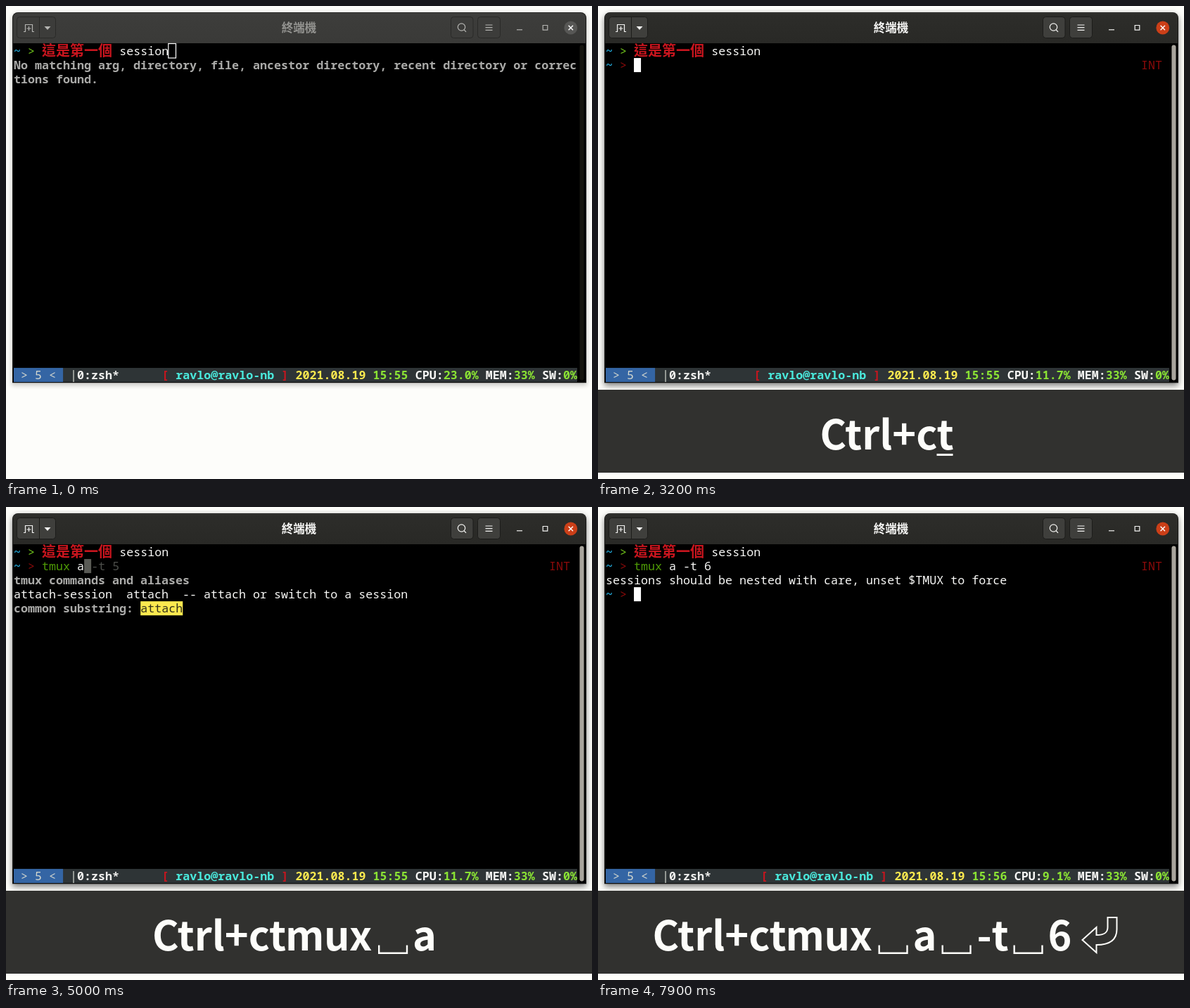
An HTML page that plays this animation: 833 px wide and 673 px high, repeating every 8000 ms.

```html
<!DOCTYPE html>
<html lang="zh-Hant">
<head>
<meta charset="utf-8">
<title>Terminal demo</title>
<style>
  html, body { margin: 0; width: 100%; height: 100%; overflow: hidden; background: #fdfdfa; }
  .shade { position: absolute; left: 10px; top: 10px; width: 814px; height: 526px; border-radius: 8px 8px 0 0; }
  #idle { box-shadow: 0 2px 6px 2px rgba(0,0,0,.2), 0 0 0 1px rgba(0,0,0,.18); }
  #live { box-shadow: 0 3px 9px 1px rgba(0,0,0,.5), 0 0 0 1px rgba(0,0,0,.23); }
  svg { position: absolute; left: 0; top: 0; display: block; }
  text { white-space: pre; }
  .term { font: 16.68px "Noto Sans Mono", "DejaVu Sans Mono", monospace; }
  .cjk { font-family: "Noto Sans CJK TC", "Noto Sans CJK JP", "Noto Sans CJK", sans-serif; font-weight: 700; }
  .b { font-weight: 700; }
  .u { text-decoration: underline; }
</style>
</head>
<body>
<div class="shade" id="idle"></div>
<div class="shade" id="live"></div>
<svg width="833" height="673" viewBox="0 0 833 673">
  <defs>
    <linearGradient id="barIdle" x2="0" y2="1"><stop stop-color="#3d3d3b"/><stop offset="1" stop-color="#3a3a38"/></linearGradient>
    <linearGradient id="barLive" x2="0" y2="1"><stop stop-color="#2d2d2a"/><stop offset="1" stop-color="#292926"/></linearGradient>
  </defs>
  <path d="M9 536V17a8 8 0 0 1 8-8H817a8 8 0 0 1 8 8V536Z" fill="#1b1b19"/>
  <rect x="10" y="53" width="814" height="482.5"/>
  <g id="headIdle"></g>
  <g id="headLive"></g>
  <g id="screen" class="term"></g>
  <g id="band"></g>
</svg>
<script>
const $ = id => document.getElementById(id);
const LOOP = 8000, CW = 10.012, RH = 20.04, X0 = 11, Y0 = 54;
const WHITE = '#f8f8f6', GREY = '#aaaaa8', DIM = '#4c4e4a', RED = '#c9151e', DARK_RED = '#8c0a0a';
const GREEN = '#8ae234', YELLOW = '#fce94f', CYAN = '#4ae9dc';
const USER = 'ravlo', HOST = 'ravlo-nb';

const esc = s => s.replace(/&/g, '&amp;').replace(/</g, '&lt;').replace(/>/g, '&gt;');
const rect = (x, y, w, h, fill, more = '') =>
  `<rect x="${x}" y="${y}" width="${w}" height="${h}" fill="${fill}" ${more}/>`;
const put = (row, col, s, fill = WHITE, cls = '') =>
  `<text x="${X0 + col * CW}" y="${Y0 + 16.2 + row * RH}" fill="${fill}" class="${cls}">${esc(s)}</text>`;
const cell = (row, col, n, fill) => rect(X0 + col * CW, Y0 + row * RH, n * CW, RH, fill);
const head = (row, s) => put(row, 0, s, GREY, 'b');

// Title bar
function header(c) {
  const btn = (x, w) => rect(x + .5, 15.5, w, 30, c.btn, `rx="4" stroke="${c.edge}"`);
  const line = (d, w = 1.2, col = c.icon) => `<path d="${d}" fill="none" stroke="${col}" stroke-width="${w}"/>`;
  return `<path d="M10 53V17a7 7 0 0 1 7-7H817a7 7 0 0 1 7 7V53Z" fill="url(#${c.bar})"/>` +
    line('M16 10.5H818', 1, c.shine) +
    btn(15, 55) + btn(632, 31.5) + btn(670, 32) +
    line('M47.5 16V45', 1, c.edge) +
    line('M25 36.5H27.5V26.5H37.5V36.5H40M32.5 29V35M29.5 32H35.5') +
    `<path d="M54.5 29H63.5L59 34Z" fill="${c.icon}"/>` +
    `<circle cx="647.5" cy="30" r="5.2" fill="none" stroke="${c.icon}" stroke-width="1.2"/>` +
    line('M651.3 34L654 36.8') +
    line('M681.5 27H691.5M681.5 30.7H691.5M681.5 34.4H691.5') +
    line('M726 33.8H734') + line('M763.2 27.5H769.8V34.2H763.2Z') +
    `<circle cx="802.8" cy="31" r="9.4" fill="${c.close}"/>` +
    line('M799.6 27.8L806 34.2M806 27.8L799.6 34.2', 1.4, '#fff') +
    `<text class="cjk" x="416.5" y="36.5" font-size="16.5" text-anchor="middle" fill="${c.text}">終端機</text>` +
    rect(815.5, 55.5, 6, 477, c.scroll, 'rx="3"');
}
$('headIdle').innerHTML = header({ bar: 'barIdle', shine: '#474745', btn: '#3c3c3a', edge: '#2a2a28',
  icon: '#b4b4b1', close: '#575755', text: '#949491', scroll: '#15140e' });
$('headLive').innerHTML = header({ bar: 'barLive', shine: '#3d3d3a', btn: '#3f3f3c', edge: '#1c1c1a',
  icon: '#f4f4f2', close: '#cb3f18', text: '#f7f7f5', scroll: '#a9a59d' });

// Terminal contents
function table(top, gap, rows) {
  return rows.map(([a, b], i) => put(top + i, 0, a.padEnd(gap) + '-- ' + b)).join('');
}
const win = (n, at, more = '') => `${n} windows (created Thu Aug 19 ${at} 2021)${more}`;
const LISTS = {
  none: '',
  noMatch: head(1, 'No matching arg, directory, file, ancestor directory, recent directory or correc') +
    head(2, 'tions found.'),
  names: head(2, 'external command') + put(3, 0, 'tmux') + head(4, 'parameter') + table(5, 25, [
    ['TMPPREFIX', '/tmp/zsh'],
    ['TMUX_PANE', '%17'],
    ['TMUX_PLUGIN_MANAGER_PATH', `/home/${USER}/.tmux/plugins/`],
    ['TMUX', '/tmp//tmux-1000/default,5349,5']]),
  commands: head(2, 'tmux commands and aliases') + table(3, 19, [
    ['attach-session', 'attach or switch to a session'],
    ['choose-buffer', 'put a pane into buffer choice mode'],
    ['if-shell', 'execute a tmux command if a shell-command succeeded'],
    ['list-commands', 'list supported sub-commands'],
    ['list-windows', 'list windows of a session'],
    ['load-buffer', 'load a file into a paste buffer'],
    ['lock-server', 'lock all clients attached to the server'],
    ['pipe-pane', 'pipe output from a pane to a shell command'],
    ['resize-pane', 'resize a pane'],
    ['save-buffer', 'save a paste buffer to a file'],
    ['select-layout', 'choose a layout for a pane'],
    ['set-option', 'set a session option'],
    ['set-window-option', 'set a window option'],
    ['split-window', 'splits a pane into two']]) +
    cell(17, 0, 6, CYAN) + put(17, 0, '(MORE)', '#20302f'),
  attach: head(2, 'tmux commands and aliases') +
    put(3, 0, 'attach-session  attach  -- attach or switch to a session') +
    head(4, 'common substring: ') + cell(4, 18, 6, YELLOW) + put(4, 18, 'attach', '#33321a'),
  sessions: head(2, 'detached sessions') + table(3, 3, [
    ['1', win(1, '11:18:51')], ['2', win(1, '11:21:46')], ['4', win(1, '11:30:06')]]) +
    head(6, 'attached sessions') + table(7, 3, [
    ['0', win(2, '10:44:57', ' (attached)')],
    ['5', win(1, '11:53:05', ' (attached)')],
    ['6', win(1, '11:53:19', ' (attached)')]]),
  nested: put(2, 0, 'sessions should be nested with care, unset $TMUX to force') +
    prompt(3, DARK_RED) + cell(3, 4, 1, '#fff')
};

function prompt(row, color) {
  return put(row, 0, '~', '#22a7d8', 'b') + put(row, 2, '>', color);
}

function command(typed, done) {
  const n = typed.length, col = 4 + n;
  const rest = n > 1 && n < 11 ? 'tmux a -t 5'.slice(n) : '';
  let s = prompt(1, DARK_RED) + put(1, 76, 'INT', DARK_RED);
  s += n < 4 ? put(1, 4, typed, WHITE, 'u') : put(1, 4, 'tmux', '#4e9a06') + put(1, 8, typed.slice(4));
  if (done) return s;
  s += cell(1, col, 1, rest ? '#5a5b56' : '#fff');
  return s + (rest ? put(1, col, rest[0], '#1c1c1a') + put(1, col + 1, rest.slice(1), DIM) : '');
}

function status([name, clock, cpu]) {
  const runs = [['[ ', RED], [`${USER}@${HOST}`, CYAN], [' ] ', RED], ['2021.08.19 ', YELLOW], [clock + ' ', GREEN],
    ['CPU:', WHITE], [cpu + '% ', GREEN], ['MEM:', WHITE], ['33% ', GREEN], ['SW:', WHITE], ['0%', GREEN]];
  let col = 80 - runs.reduce((n, r) => n + r[0].length, 0);
  let s = cell(23, 0, 80, '#2e3436') + cell(23, 0, 7, '#3465a4') +
    put(23, 1, '> 5 <', '#d3d7cf') + put(23, 8, '|', '#d3d7cf') + put(23, 9, `0:${name}*`, '#eeeeec', 'b');
  for (const [txt, color] of runs) {
    s += put(23, col, txt, color, 'b');
    col += txt.length;
  }
  return s;
}

// Key caption: each key and its advance
const KEYS = [['Ctrl+c', 166], ['t', 23], ['m', 55], ['u', 36], ['x', 34], [' ', 56], ['a', 34],
  [' ', 57], ['-', 21], ['t', 24], [' ', 56], ['6', 34], ['\n', 69]];

function caption(count, marked) {
  if (!count) return '';
  const shown = KEYS.slice(0, count);
  let x = 410 - shown.reduce((n, k) => n + k[1], 0) / 2;
  let s = rect(0, 546, 833, 118, '#31312f');
  shown.forEach(([key, w], i) => {
    if (key === ' ')
      s += `<path d="M${x + 8.2} 623.5V634.8H${x + 48}V623.5" fill="none" stroke="#fdfdfa" stroke-width="2.4"/>`;
    else if (key === '\n')
      s += `<path transform="translate(${x + 14} 583)" d="M37 1H50V18C50 33 40 40 21 40V51L1 33L21 15V26C32 26 37 23 37 15Z" fill="none" stroke="#fdfdfa" stroke-width="2"/>`;
    else
      s += `<text class="cjk" x="${x}" y="631" font-size="57.5" fill="#fdfdfa">${key}</text>`;
    if (marked && i === count - 1) s += rect(x, 637, w, 3, '#fdfdfa');
    x += w;
  });
  return s;
}

// time, keys shown, last key underlined, typed command, list, status
const S0 = ['zsh', '15:55', '23.0'], S1 = ['zsh', '15:55', '11.7'];
const S2 = ['true', '15:56', '9.1'], S3 = ['zsh', '15:56', '9.1'];
const STEPS = [
  [0, 0, 0, null, 'noMatch', S0],
  [600, 0, 0, null, 'noMatch', S0],
  [1800, 1, 1, '', 'none', S1],
  [2000, 1, 0, '', 'none', S1],
  [3200, 2, 1, '', 'none', S1],
  [3300, 3, 1, 't', 'none', S1],
  [3400, 3, 1, 'tm', 'names', S1],
  [3500, 4, 1, 'tm', 'names', S1],
  [3600, 5, 1, 'tmu', 'names', S1],
  [3700, 6, 0, 'tmux', 'names', S1],
  [3900, 6, 0, 'tmux ', 'commands', S1],
  [4800, 7, 1, 'tmux ', 'commands', S1],
  [5000, 7, 0, 'tmux a', 'attach', S1],
  [6100, 8, 0, 'tmux a ', 'none', S1],
  [6300, 9, 1, 'tmux a -', 'none', S2],
  [6500, 10, 1, 'tmux a -t', 'none', S2],
  [6600, 11, 1, 'tmux a -t ', 'none', S2],
  [6700, 11, 0, 'tmux a -t ', 'sessions', S2],
  [7300, 12, 1, 'tmux a -t ', 'sessions', S2],
  [7500, 12, 0, 'tmux a -t 6', 'none', S2],
  [7700, 13, 1, 'tmux a -t 6', 'none', S2],
  [7900, 13, 0, 'tmux a -t 6', 'nested', S3]
];

function show([time, keys, marked, typed, list, bar]) {
  let s = prompt(0, '#73c91c') + put(0, 15, 'session') +
    `<text class="cjk" x="51" y="71" font-size="20" fill="${RED}">這是第一個</text>`;
  if (typed !== null) s += command(typed, list === 'nested');
  else if (time) s += cell(0, 22, 1, '#fff');
  else s += rect(230.8, 53.5, 10.7, 20.5, 'none', 'stroke="#fff" stroke-width="1.2"');
  $('screen').innerHTML = s + LISTS[list] + status(bar);
  $('band').innerHTML = caption(keys, marked);
}

let current = -1;
const start = performance.now();
function draw() {
  const t = (performance.now() - start) % LOOP;
  let i = STEPS.length - 1;
  while (STEPS[i][0] > t) i--;
  if (i !== current) show(STEPS[current = i]);
  // window gains focus in six steps, easing out
  const k = Math.min(6, Math.max(0, Math.floor(t / 100) - 5)) / 6;
  const focus = 1 - (1 - k) ** 2;
  $('headLive').style.opacity = $('live').style.opacity = focus;
  $('idle').style.opacity = 1 - focus;
  requestAnimationFrame(draw);
}
draw();
</script>
</body>
</html>
```
